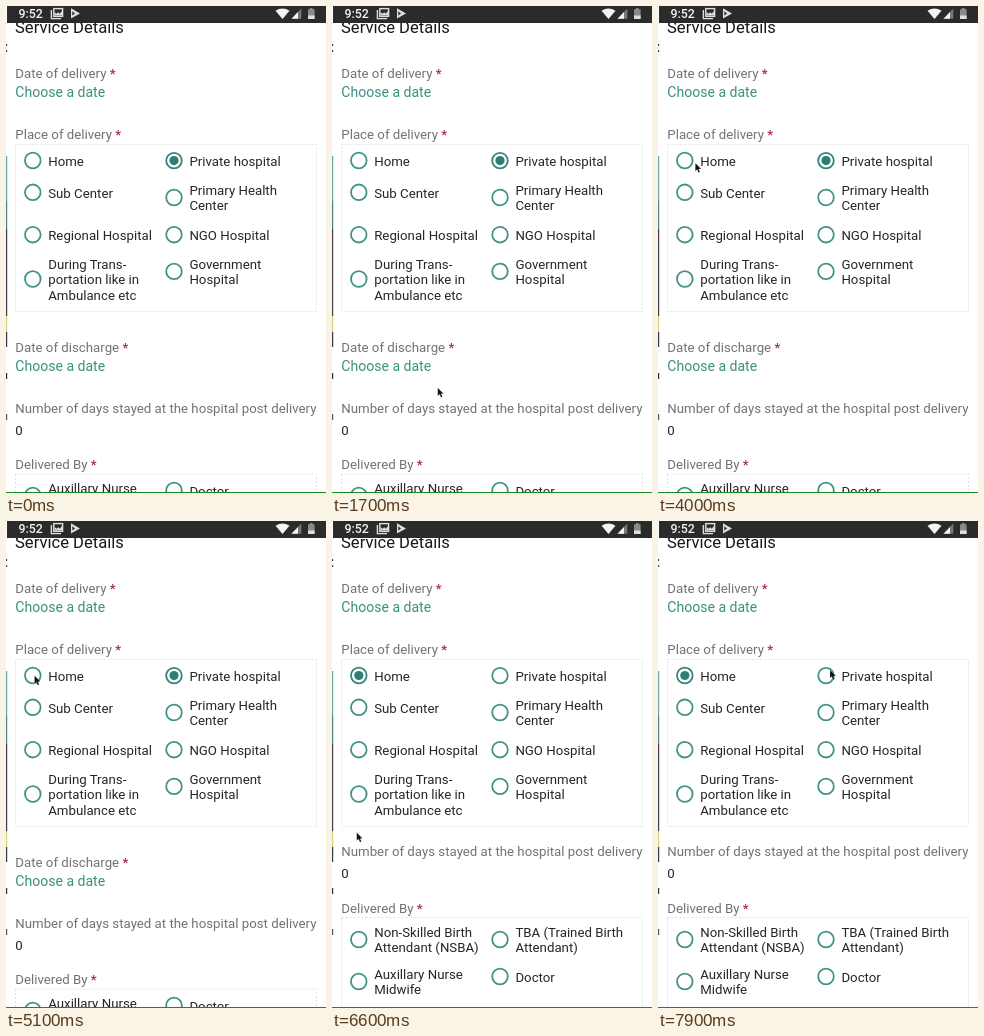
Write an HTML page that moves like this. It is 320x487 px and loops after 8 s.

```html
<!DOCTYPE html>
<html lang="en">
<head>
<meta charset="utf-8">
<title>Service details form</title>
<style>
  html, body { margin: 0; width: 100%; height: 100%; overflow: hidden; background: #fff; }
  svg { display: block; width: 320px; height: 487px; font: 13.25px Roboto, Arial, sans-serif; }
  .label { fill: #727272; }
  .star { fill: #a02c58; font-weight: 500; }
  .link { fill: #3b9082; font-size: 14.05px; }
  .option, .value { fill: #262626; }
  .title { fill: #181818; font-size: 16.6px; }
  .clock { fill: #f4f4f4; font-size: 12.4px; font-weight: 500; }
  .ring { fill: #fff; stroke: #439287; stroke-width: 1.8; }
  .dot { fill: #2d7f76; }
  .box { fill: none; stroke: #e2e2e2; stroke-dasharray: 2 2; }
</style>
</head>
<body>
<svg id="stage" viewBox="0 0 320 487" xmlns="http://www.w3.org/2000/svg">
  <rect width="320" height="487" fill="#fff"/>
  <g id="edge"></g>
  <g id="form"></g>
  <g id="discharge"></g>
  <g id="lower"></g>
  <g id="status">
    <rect x="1" width="319" height="17" fill="#2b2b2c"/>
    <text class="clock" x="12.5" y="12.3">9:52</text>
    <g fill="none" stroke="#dedede" stroke-width="1.4">
      <path d="M45.4 4V12.6H55"/>
      <rect x="47.8" y="2.6" width="8.8" height="7.8"/>
    </g>
    <path d="M48.5 9.6V6l2 1.8 1.7-1.6 1.6 1.6L56 5v4.6z" fill="#dedede"/>
    <path d="M65 2.2L74 7.4 65 12.6z" fill="#dedede"/>
    <path d="M66.3 5.2L69 7.4 66.3 9.6z" fill="#2b2b2c"/>
    <path d="M269.5 4.7Q276.5 .2 283.5 4.7L276.5 13z" fill="#f4f4f4"/>
    <path d="M295.3 2.5V12.8H285.5z" fill="#777"/>
    <path d="M292 6V12.8H285.5z" fill="#f4f4f4"/>
    <path d="M302 3.2h2V2h2.6v1.2h2V13H302z" fill="#8a8a8a"/>
    <path d="M302 9.5h6.6V13H302z" fill="#dedede"/>
  </g>
  <rect y="486" width="320" height="1" fill="#1b8a26"/>
  <path id="cursor" d="M0 0V8.2L1.8 6.6 3.3 9.8 4.7 9.1 3.4 6H5.9z"
        fill="#111" stroke="#fff" stroke-opacity=".5" stroke-width=".4"/>
</svg>
<script>
const LOOP = 8000, STEP = 100, SELECT = 5400;
const LINE = 15.4;
const get = id => document.getElementById(id);

function add(parent, tag, attrs, text) {
  const el = document.createElementNS("http://www.w3.org/2000/svg", tag);
  for (const key in attrs) el.setAttribute(key, attrs[key]);
  if (text) el.textContent = text;
  parent.append(el);
  return el;
}

const write = (parent, cls, x, y, text) => add(parent, "text", { class: cls, x, y }, text);

function label(parent, y, text, required) {
  const el = write(parent, "label", 9.3, y, text);
  if (required) add(el, "tspan", { class: "star" }, " *");
}

function radio(parent, x, y, lines, baseline) {
  const ring = add(parent, "circle", { class: "ring", cx: x, cy: y, r: 7.8 });
  const dot = add(parent, "circle", { class: "dot", cx: x, cy: y, r: 0 });
  lines.forEach((line, i) => write(parent, "option", x + 15.4, baseline + i * LINE, line));
  return { ring, dot };
}

const box = (parent, y, height) =>
  add(parent, "rect", { class: "box", x: 9.5, y, width: 301, height });

// Sliver of the window behind the phone: [top, height, colour]
[[38, 2, "#444"], [44, 2, "#444"], [150, 45, "#69a5a3"], [195, 28, "#527f80"],
 [223, 87, "#3f3b4c"], [310, 16, "#d9cf83"], [326, 15, "#33384e"],
 [367, 6, "#333"], [408, 6, "#555"]]
  .forEach(([y, height, fill]) => add(get("edge"), "rect", { y, width: 1.2, height, fill }));

const form = get("form");
write(form, "title", 9, 27, "Service Details");
label(form, 72, "Date of delivery", true);
write(form, "link", 9.3, 91.2, "Choose a date");
label(form, 133, "Place of delivery", true);
box(form, 138.5, 167);
const home = radio(form, 26.8, 154.5, ["Home"], 160);
const hospital = radio(form, 168, 154.6, ["Private hospital"], 160);
radio(form, 26.8, 186.3, ["Sub Center"], 191.6);
radio(form, 168, 191.5, ["Primary Health", "Center"], 189);
radio(form, 26.8, 228.7, ["Regional Hospital"], 234);
radio(form, 168, 228.7, ["NGO Hospital"], 234);
radio(form, 26.8, 273, ["During Trans-", "portation like in", "Ambulance etc"], 262.8);
radio(form, 168, 265.4, ["Government", "Hospital"], 262.8);

const discharge = get("discharge");
label(discharge, 345.7, "Date of discharge", true);
write(discharge, "link", 9.3, 364.7, "Choose a date");

const lower = get("lower");
label(lower, 335, "Number of days stayed at the hospital post delivery");
write(lower, "value", 9.3, 357.3, "0");
label(lower, 391.5, "Delivered By", true);
box(lower, 396.5, 130);
const homeOnly = add(lower, "g", {});
radio(homeOnly, 26.8, 418.5, ["Non-Skilled Birth", "Attendant (NSBA)"], 415.7);
radio(homeOnly, 168, 418.5, ["TBA (Trained Birth", "Attendant)"], 415.7);
const staff = add(lower, "g", {});
radio(staff, 26.8, 460.5, ["Auxillary Nurse", "Midwife"], 457.7);
radio(staff, 168, 455.5, ["Doctor"], 460.5);

// Pointer path: [time, x, y]
const path = [
  [900, -10, 389], [1400, 100, 389], [1700, 105.7, 381.7], [1900, 105.7, 381.7],
  [2600, 103, 372.5], [2700, 101, 367], [3100, 98, 366], [3400, 98, 366],
  [3700, 47, 167], [3900, 38, 157.5], [4000, 37.3, 157], [4600, 28.5, 154.5],
  [6000, 28.5, 154.5], [6300, 18, 250], [6600, 24.7, 311.5], [6800, 55, 342],
  [7200, 150, 330], [7400, 197, 275], [7700, 166, 198], [7800, 169, 165],
  [7900, 172, 149], [8000, 172, 149]
];

function pointerAt(t) {
  const i = path.findIndex(p => p[0] > t);
  if (i < 1) return path[0].slice(1);
  const [t0, x0, y0] = path[i - 1], [t1, x1, y1] = path[i];
  const k = (t - t0) / (t1 - t0);
  return [x0 + (x1 - x0) * k, y0 + (y1 - y0) * k];
}

function paintRadio({ ring, dot }, level) {
  const pale = level > 0 && level < .5;
  ring.style.stroke = pale ? "#dce5e3" : level >= .5 ? "#34847b" : "";
  ring.style.fill = pale ? "#e8eeed" : "";
  dot.style.fill = pale ? "#cbd9d7" : "";
  dot.setAttribute("r", level ? 3.6 + level : 0);
}

function render(now) {
  const t = Math.floor(now % LOOP / STEP) * STEP;
  const atHome = t >= SELECT;
  paintRadio(home, atHome ? Math.min(1, .3 + (t - SELECT) / 250) : 0);
  paintRadio(hospital, atHome ? 0 : 1);
  discharge.style.display = homeOnly.style.display = "";
  (atHome ? discharge : homeOnly).style.display = "none";
  lower.setAttribute("transform", `translate(0 ${atHome ? 0 : 71.5})`);
  staff.setAttribute("transform", `translate(0 ${atHome ? 0 : -42.5})`);
  get("cursor").setAttribute("transform", `translate(${pointerAt(t)})`);
}

const start = performance.now();
function tick() {
  render(performance.now() - start);
  requestAnimationFrame(tick);
}
tick();
</script>
</body>
</html>
```
